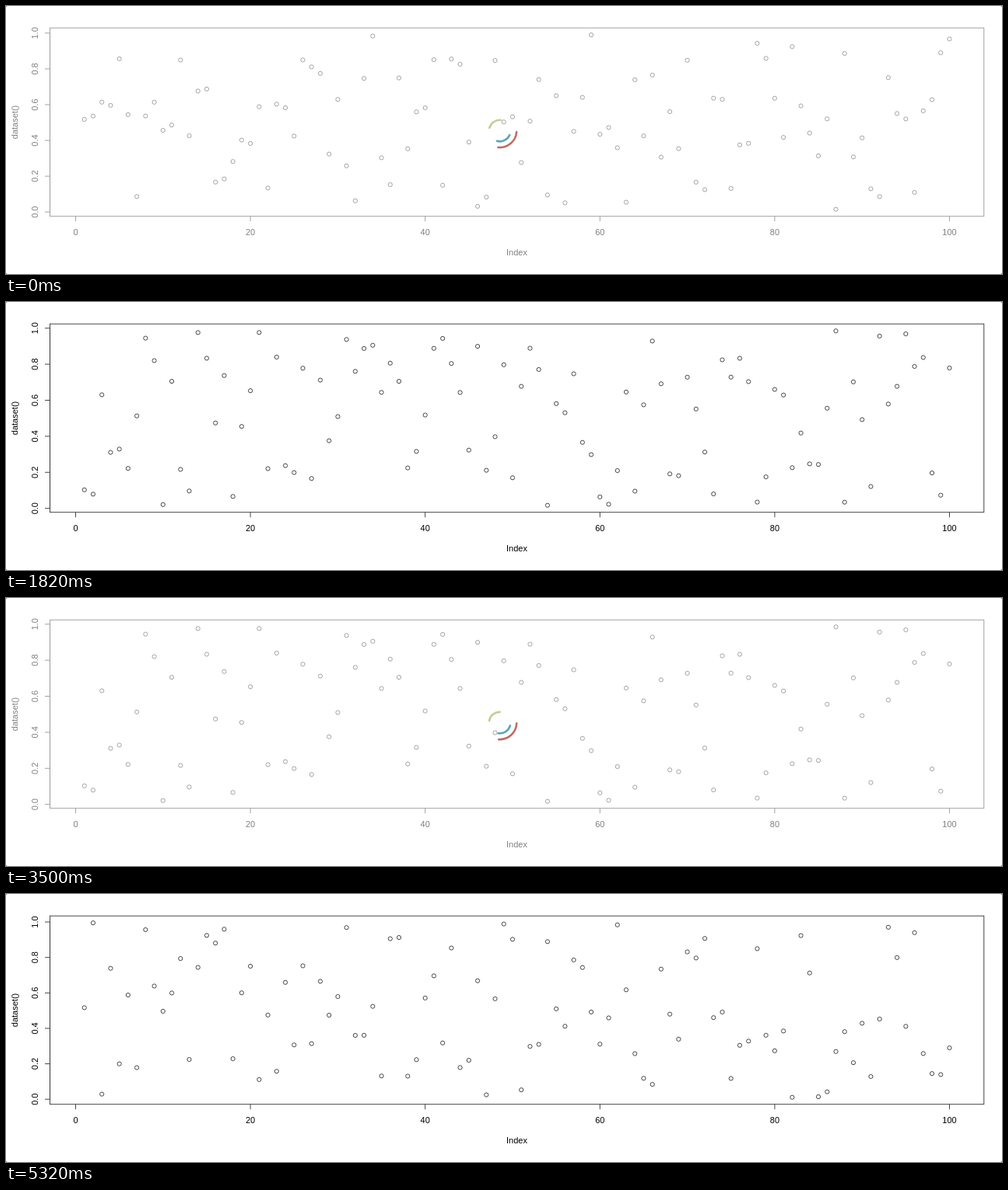
These frames come from a looping animation (1280 by 345 pixels, 5.46 s). An HTML page with a canvas:

```html
<!DOCTYPE html>
<html lang="en">
<head>
<meta charset="utf-8">
<title>Scatter plot reloading</title>
<style>
html, body { margin: 0; width: 100%; height: 100%; overflow: hidden; background: #fff; }
canvas { display: block; }
</style>
</head>
<body>
<canvas id="stage" width="1280" height="345"></canvas>
<script>
const ctx = document.getElementById('stage').getContext('2d');
const LOOP = 5460, STEP = 70;
const SECOND = 1820, RELOAD = 1890, THIRD = 5320;
const BOX = { left: 56.5, right: 1256.8, top: 28.2, bottom: 270.7 };
const FRESH = { line: '#333', text: '#000' };
const STALE = { line: '#999', text: '#808080' };

function seededRandom(seed) {
  return () => {
    seed = (seed + 0x6d2b79f5) | 0;
    let r = Math.imul(seed ^ (seed >>> 15), seed | 1);
    r ^= r + Math.imul(r ^ (r >>> 7), r | 61);
    return ((r ^ (r >>> 14)) >>> 0) / 4294967296;
  };
}

// Uniform values stretched to the range low..high, which also sets the
// vertical scale: the box extends past the data by 4% at each end.
function makePlot(seed, low, high) {
  const raw = Array.from({ length: 100 }, seededRandom(seed));
  const min = Math.min(...raw), max = Math.max(...raw);
  const unit = (BOX.bottom - BOX.top) / 1.08;
  const row = v => BOX.bottom - unit * (0.04 + (v - low) / (high - low));
  const values = raw.map(r => low + (high - low) * (r - min) / (max - min));
  return { row, values };
}

const first = makePlot(11, 0.015, 0.99);
const second = makePlot(23, 0.017, 0.985);
const third = makePlot(37, 0.011, 0.995);

const column = i => 89.5 + 11.23 * i;

function line(x1, y1, x2, y2) {
  ctx.beginPath();
  ctx.moveTo(x1, y1);
  ctx.lineTo(x2, y2);
  ctx.stroke();
}

function label(text, x, y, upright) {
  ctx.save();
  ctx.translate(x, y);
  if (upright) ctx.rotate(-Math.PI / 2);
  ctx.fillText(text, 0, 4);
  ctx.restore();
}

function drawPlot({ row, values }, ink) {
  ctx.strokeStyle = ink.line;
  ctx.fillStyle = ink.text;
  ctx.font = '11px "Liberation Sans", Arial, sans-serif';
  ctx.textAlign = 'center';
  ctx.lineWidth = 0.9;

  ctx.strokeRect(BOX.left, BOX.top, BOX.right - BOX.left, BOX.bottom - BOX.top);
  line(BOX.left, row(0), BOX.left, row(1));
  for (let k = 0; k <= 5; k++) {
    const x = column(20 * k), y = row(k / 5);
    line(x, BOX.bottom, x, BOX.bottom + 6.5);
    line(BOX.left, y, BOX.left - 6.5, y);
    label(String(20 * k), x, 291);
    label((k / 5).toFixed(1), 37, y, true);
  }
  label('Index', 656.5, 317);
  label('dataset()', 11, 149.5, true);

  values.forEach((v, i) => {
    ctx.beginPath();
    ctx.arc(column(i + 1), row(v), 2.6, 0, 2 * Math.PI);
    ctx.stroke();
  });
}

function drawArc(color, radius, span, angle) {
  const rad = Math.PI / 180;
  ctx.strokeStyle = color;
  ctx.beginPath();
  ctx.arc(634.6, 160.5, radius, (angle - span / 2) * rad, (angle + span / 2) * rad);
  ctx.stroke();
}

// Three arcs leave the top together and turn at their own speeds.
function drawSpinner(age) {
  ctx.lineWidth = 2.6;
  ctx.lineCap = 'round';
  drawArc('#bf6f5f', 21.6, 92, -90 + 0.0857 * age);
  drawArc('#c4cd92', 13.8, 80, -90 + 0.199 * age);
  drawArc('#5aa5c3', 13.8, 82, -90 + 0.315 * age);
  ctx.lineCap = 'butt';
}

// The first spinner is already turning, and stutters before it runs smoothly.
function firstAge(t) {
  const held = t < 560 ? Math.floor(t / 280) * 280 : t;
  return 1586 + Math.max(47, held);
}

function draw(t) {
  ctx.fillStyle = '#fff';
  ctx.fillRect(0, 0, 1280, 345);
  if (t < SECOND) {
    drawPlot(first, STALE);
    drawSpinner(firstAge(t));
  } else if (t < RELOAD) {
    drawPlot(second, FRESH);
  } else if (t < THIRD) {
    drawPlot(second, STALE);
    drawSpinner(t - RELOAD);
  } else {
    drawPlot(third, FRESH);
  }
  ctx.fillStyle = '#888';
  for (const x of [0, 1279]) for (const y of [0, 344]) ctx.fillRect(x, y, 1, 1);
}

const start = performance.now();
function tick() {
  const t = (performance.now() - start) % LOOP;
  draw(Math.floor(t / STEP) * STEP);
  requestAnimationFrame(tick);
}
tick();
</script>
</body>
</html>
```
